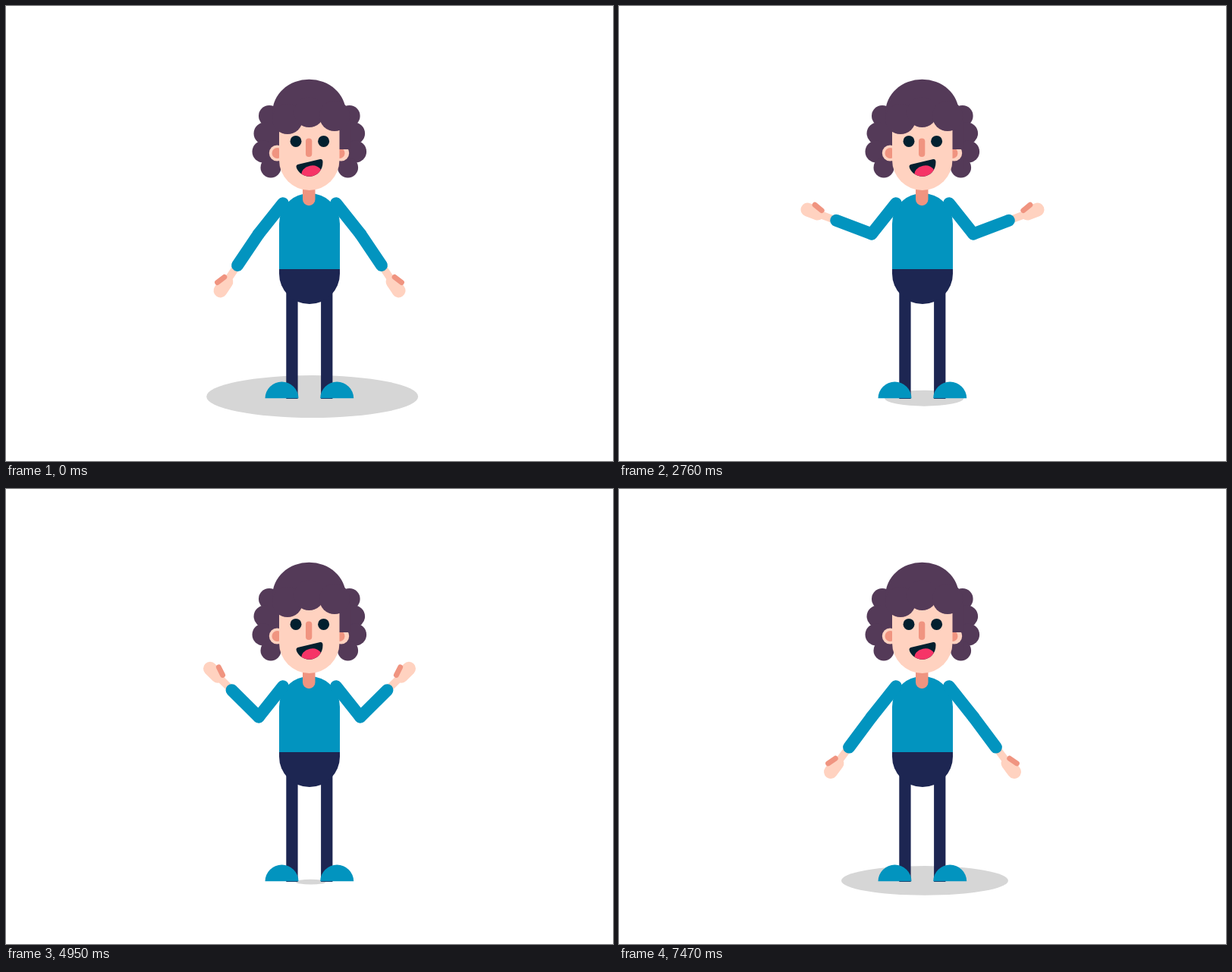
An HTML page for the animation above (7.5 s loop, 800 by 600 pixels).

```html
<!DOCTYPE html>
<html lang="en">
<head>
<meta charset="utf-8">
<title>Friendly shrug</title>
<style>
  html, body { margin: 0; width: 100%; height: 100%; overflow: hidden; background: #fff; }
  svg { display: block; width: 100vw; height: 100vh; }
  .hair { fill: #543a58; }
  .skin { fill: #ffd2c0; }
  .coral { fill: #f09480; }
  .shirt { fill: #0294bf; }
  .pants { fill: #1d2652; }
  .ink { fill: #02202f; }
  .sleeve { fill: none; stroke: #0294bf; stroke-width: 16; stroke-linecap: round; stroke-linejoin: round; }
  .thumb { stroke: #f09480; stroke-width: 7; stroke-linecap: round; }
</style>
</head>
<body>
<svg viewBox="0 0 800 600">
  <defs>
    <clipPath id="mouthClip"><use href="#mouth"/></clipPath>
    <g id="curls">
      <circle cx="347" cy="145" r="14"/>
      <circle cx="341" cy="168" r="14.5"/>
      <circle cx="339" cy="192" r="14.5"/>
      <circle cx="349" cy="213" r="13.5"/>
      <path d="M346 138H362V215H346Z"/>
    </g>
    <g id="leg">
      <path class="pants" d="M369.3 365H384.6V518H369.3Z"/>
      <path class="shirt" d="M341.5 517.3A22 21.8 0 0 1 385.5 517.3Z"/>
    </g>
    <g id="arm">
      <g transform="translate(333 300.5)">
        <g class="forearm">
          <path class="skin" d="M-75 -5H-50V5H-75Z"/>
          <rect class="skin" x="-99.3" y="-9" width="32" height="18" rx="9"/>
          <path class="thumb" d="M-83.5 -9.3L-72.5 -5.6"/>
          <path class="sleeve" d="M0 0H-50"/>
        </g>
      </g>
      <path class="sleeve" d="M365 260.3L333 300.5"/>
    </g>
  </defs>

  <ellipse id="shadow" fill="#d6d6d6"/>

  <use href="#leg"/>
  <use href="#leg" transform="matrix(-1 0 0 1 799.7 0)"/>

  <path class="shirt" d="M360 348V287A40 40 0 0 1 440 287V348Z"/>
  <path class="pants" d="M360 347H440V353A40 40 0 0 1 360 353Z"/>
  <g id="arms"></g>

  <g class="hair">
    <use href="#curls"/>
    <use href="#curls" transform="matrix(-1 0 0 1 799.6 0)"/>
    <ellipse cx="399.5" cy="140" rx="48.2" ry="43.3"/>
  </g>
  <path class="coral" d="M391 236H407.5V255A8.2 8.2 0 0 1 391 255Z"/>
  <circle class="skin" cx="357.3" cy="194" r="10.5"/>
  <circle class="coral" cx="357.5" cy="194" r="7"/>
  <circle class="skin" cx="441.7" cy="194" r="10.5"/>
  <circle class="coral" cx="439.5" cy="194" r="7"/>
  <path class="hair" d="M436 160H452V189H436Z"/>
  <path class="skin" d="M360 145H439.5V203A39.75 40 0 0 1 360 203Z"/>
  <g class="hair">
    <path d="M358 125H441V150H358Z"/>
    <circle cx="371" cy="149" r="20"/>
    <circle cx="399.5" cy="140" r="20"/>
    <circle cx="433" cy="145" r="20"/>
  </g>

  <circle class="ink" cx="382" cy="178.4" r="7.5"/>
  <ellipse id="eye" class="ink" cx="418.6" cy="178.4" rx="7.5" ry="7.5"/>
  <rect class="coral" x="395" y="174.5" width="8.3" height="24.5" rx="4.1"/>
  <path id="mouth" class="ink" d="M384.5 209L414 202Q417.6 201.5 417.5 206C417.5 217 410 224 401 224.8C390 225 383 217 382.5 211.5Q382.5 209.5 384.5 209Z"/>
  <g clip-path="url(#mouthClip)">
    <ellipse cx="402.5" cy="220.5" rx="13.3" ry="10" fill="#f63467" transform="rotate(-12 402.5 220.5)"/>
  </g>
</svg>
<script>
const LOOP = 7500, STEP = 30, TURN = 4400;
const $ = id => document.getElementById(id);

// tracks of [time, value]
const swing = [[0, 56], [TURN, -66.3], [LOOP, 54.5]];
const width = [[0, 139.5], [TURN, 0], [LOOP, 111]];
const height = [[0, 28], [TURN, 0], [LOOP, 19.5]];
const shiftX = [[0, 403.7], [TURN, 401.4], [LOOP, 403]];
const shiftY = [[0, 515], [TURN, 518.5], [LOOP, 516.4]];
const wink = [
  [0, 1], [400, 1], [900, 0], [1570, 0], [2060, 1],
  [2870, 1], [3370, 0], [4130, 0], [4630, 1],
  [5330, 1], [5830, 0], [6730, 0], [7230, 1], [LOOP, 1]
];

function at(track, t) {
  const i = Math.max(1, track.findIndex(k => k[0] >= t));
  const [t0, a] = track[i - 1], [t1, b] = track[i];
  return a + (b - a) * (t - t0) / (t1 - t0);
}

// two real copies of the arm, the second mirrored
const forearms = [null, 'matrix(-1 0 0 1 800 0)'].map(flip => {
  const arm = $('arm').cloneNode(true);
  arm.removeAttribute('id');
  if (flip) arm.setAttribute('transform', flip);
  $('arms').append(arm);
  return arm.querySelector('.forearm');
});

function set(el, attrs) {
  for (const name in attrs) el.setAttribute(name, attrs[name]);
}

function draw(t) {
  for (const arm of forearms) set(arm, { transform: `rotate(${-at(swing, t)})` });
  set($('shadow'), {
    cx: at(shiftX, t), cy: at(shiftY, t),
    rx: at(width, t), ry: at(height, t)
  });
  set($('eye'), { ry: 7.5 * at(wink, t) });
}

const start = performance.now();
function tick() {
  const t = (performance.now() - start) % LOOP;
  draw(Math.floor(t / STEP) * STEP);
  requestAnimationFrame(tick);
}
tick();
</script>
</body>
</html>
```
